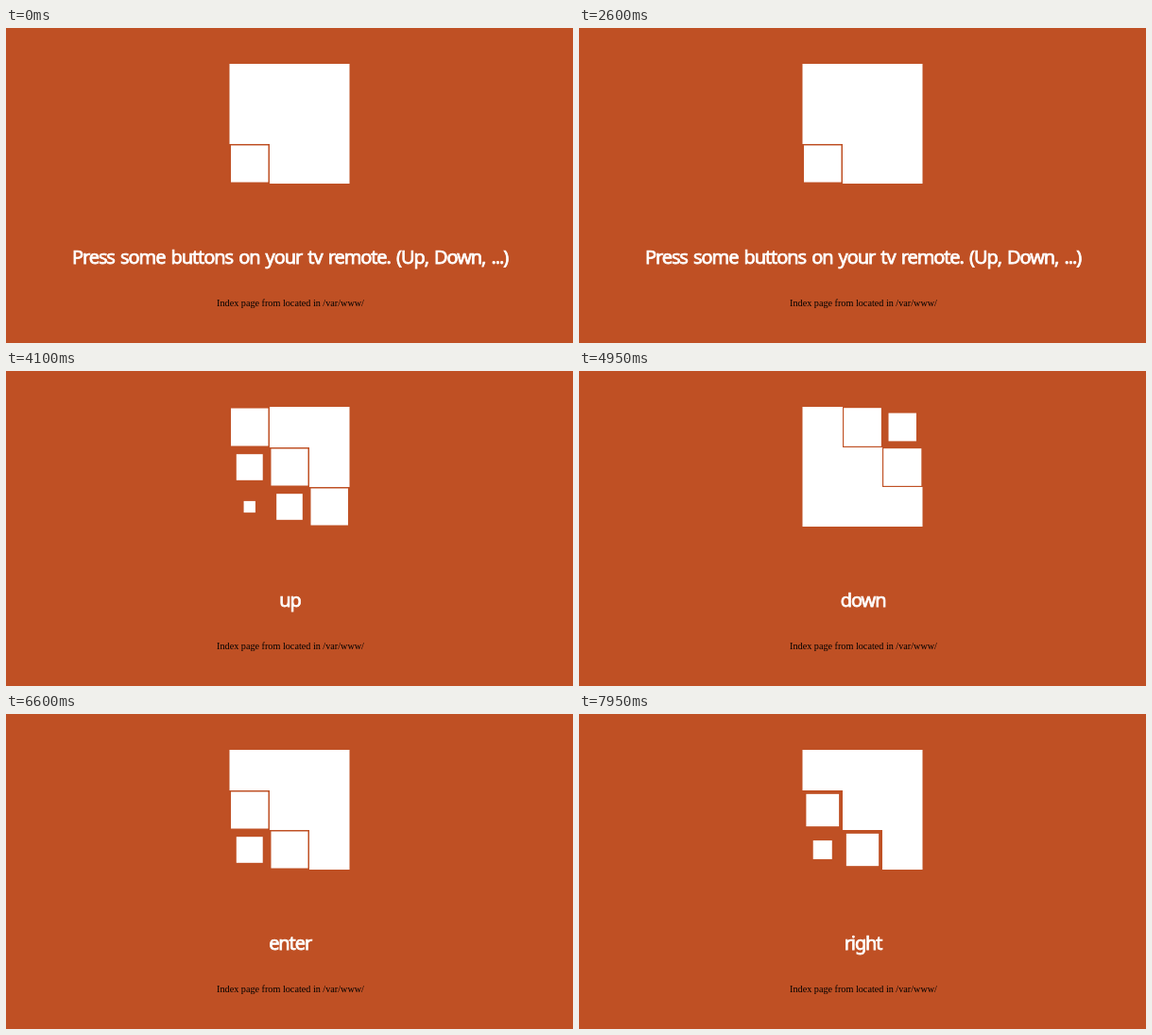
Write an HTML page that moves like this. It is 600 px wide and 334 px high and loops after 8 s.

```html
<!DOCTYPE html>
<html lang="en">
<head>
<meta charset="utf-8">
<title>TV remote</title>
<style>
  html, body { margin: 0; width: 100%; height: 100%; overflow: hidden; background: #bf5024; }
  svg { display: block; width: 600px; height: 334px; }
  text { text-anchor: middle; }
  #message {
    font: 20px "Noto Sans", sans-serif;
    letter-spacing: -1.1px; word-spacing: 2.1px;
    fill: #fff; stroke: #fff; stroke-width: .75px;
  }
  #note { font: 10.2px "Liberation Serif", serif; fill: #000; }
</style>
</head>
<body>
<svg viewBox="0 0 600 334">
  <g id="grid" fill="#fff"></g>
  <text id="message" x="300.6" y="250.3"></text>
  <text id="note" x="301" y="295">Index page from located in /var/www/</text>
</svg>
<script>
const LOOP = 8000, STEP = 50;
const PULSE = 1300, PULSE_OFFSET = 85;
const COLUMN_EDGES = [236.5, 279, 321, 363.5];
const ROW_EDGES = [38, 81, 123, 165];

const MESSAGES = [
  [0, "Press some buttons on your tv remote. (Up, Down, ...)"],
  [3350, "up"],
  [4450, "down"],
  [5350, "left"],
  [6300, "enter"],
  [7050, "right"],
];

const grid = document.getElementById("grid");
const message = document.getElementById("message");

// The wave starts at the bottom left and runs to the top right.
const cubes = [];
for (let row = 0; row < 3; row++) {
  for (let column = 0; column < 3; column++) {
    const rect = document.createElementNS("http://www.w3.org/2000/svg", "rect");
    grid.append(rect);
    cubes.push({
      rect,
      x: COLUMN_EDGES[column],
      y: ROW_EDGES[row],
      width: COLUMN_EDGES[column + 1] - COLUMN_EDGES[column],
      height: ROW_EDGES[row + 1] - ROW_EDGES[row],
      delay: (column + 2 - row) * 100,
    });
  }
}

// cubic-bezier(.42, 0, .58, 1)
function easeInOut(x) {
  let low = 0, high = 1, u = .5;
  for (let i = 0; i < 24; i++) {
    u = (low + high) / 2;
    const bezierX = 1.26 * u * (1 - u) ** 2 + 1.74 * u * u * (1 - u) + u ** 3;
    if (bezierX < x) low = u; else high = u;
  }
  return u * u * (3 - 2 * u);
}

// Shrinks until 35 %, grows until 70 %, then rests.
function pulseScale(time) {
  const phase = ((time % PULSE + PULSE) % PULSE) / PULSE;
  if (phase >= .7) return 1;
  const scale = phase < .35 ? 1 - easeInOut(phase / .35) : easeInOut(phase / .35 - 1);
  return scale > .985 ? 1 : scale; // no hairline seams between nearly full cubes
}

function draw(time) {
  for (const { rect, x, y, width, height, delay } of cubes) {
    const scale = pulseScale(time + PULSE_OFFSET - delay);
    rect.setAttribute("x", x + width * (1 - scale) / 2);
    rect.setAttribute("y", y + height * (1 - scale) / 2);
    rect.setAttribute("width", width * scale);
    rect.setAttribute("height", height * scale);
  }
  const text = MESSAGES.findLast(([start]) => time >= start)[1];
  if (message.textContent !== text) message.textContent = text;
}

const startTime = performance.now();
function frame() {
  const elapsed = (performance.now() - startTime) % LOOP;
  draw(Math.floor(elapsed / STEP) * STEP);
  requestAnimationFrame(frame);
}
frame();
</script>
</body>
</html>
```
